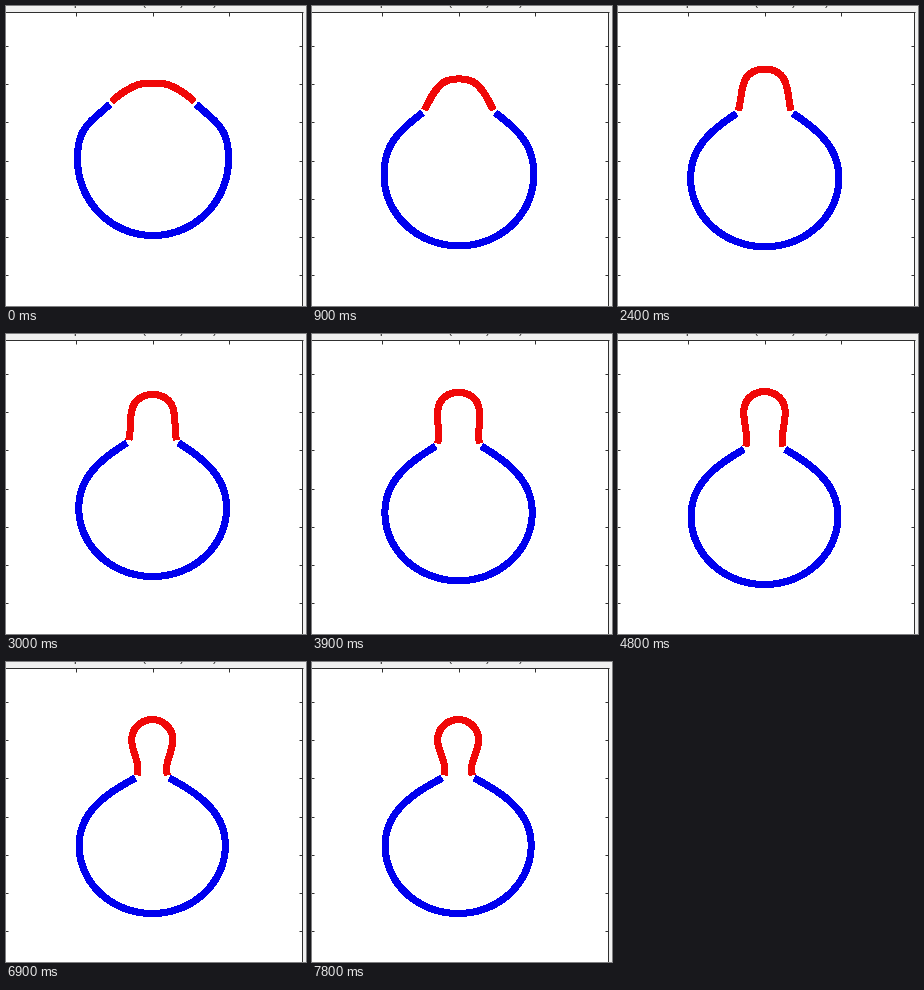
Recreate the animation shown at these times as a matplotlib script. Size 300 by 300 pixels, loop 8000 ms.

```python
import numpy as np
import matplotlib.pyplot as plt
from matplotlib.animation import FuncAnimation
from matplotlib.patches import Rectangle

PX = 0.72  # points per pixel at 100 dpi
STEP_FRAMES = 3
RIGHT, TOP = 296, 6


def smooth(x):
    x = np.clip(x, 0, 1)
    return x * x * (3 - 2 * x)


def heading(degrees):
    return np.array([np.cos(np.radians(degrees)), np.sin(np.radians(degrees))])


def bezier(start, start_angle, end, end_angle, handle):
    """Cubic from start to end; handles are a fraction of the chord."""
    start, end = np.array(start), np.array(end)
    reach = handle * np.hypot(*(end - start))
    a = start + reach * heading(start_angle)
    b = end - reach * heading(end_angle)
    t = np.linspace(0, 1, 40)[:, None]
    s = 1 - t
    return s**3 * start + 3 * s * s * t * a + 3 * s * t * t * b + t**3 * end


def mirror(half, step):
    """Full outline from a half that starts on the symmetry axis."""
    points = np.vstack([half[::-1] * (-1, 1), half])
    return (points + (147 - step / 30, 0)).T


def membrane(step):
    pinch = 1 - np.exp(-step / 12)
    early = np.exp(-step / 3)
    sink = 11 * (smooth(step / 3.5) + smooth((step - 7) / 11))
    neck = 41 - 30.5 * pinch
    rim = 98.7 + 0.8 * sink

    # Vesicle body: half ellipse below, shoulder rising to the rim
    width, height = 75.5 - 2.8 * pinch, 68 + 8 * early
    middle = 229.5 + sink - height
    angle = np.linspace(np.pi / 2, 0, 60)
    bowl = np.column_stack([width * np.cos(angle), middle + height * np.sin(angle)])
    shoulder = bezier((width, middle), -90, (neck + 2.5, rim),
                      180 + 41 - 15 * pinch, 0.38 + 0.09 * early)

    # Bud: crown bending over to the side, then down to the neck
    crown = 77 - 19.5 * smooth(pinch / 0.75)
    side = (20.5, crown + 4 + 18.5 * pinch)
    side_angle = 27 + 110 * pinch - 42 * pinch**2
    neck_angle = 42 + 110 * pinch - 80 * pinch**2
    dome = bezier((0, crown), 0, side, side_angle, 0.38)
    stem = bezier(side, side_angle, (neck, rim - 3.5), neck_angle, 0.38)

    return (mirror(np.vstack([bowl, shoulder]), step),
            mirror(np.vstack([dome, stem]), step))


fig = plt.figure(figsize=(3, 3), dpi=100, facecolor="#f0f0f0")
ax = fig.add_axes([0, 0, 1, 1])
ax.set(xlim=(0, 300), ylim=(300, 0))
ax.axis("off")
ax.add_patch(Rectangle((-1, TOP), RIGHT + 1, 300, fc="white", ec="none"))


def rule(xs, ys):
    ax.plot(xs, ys, color="#303030", lw=PX, solid_capstyle="butt")


rule([-1, RIGHT + 0.5], [TOP, TOP])
rule([RIGHT, RIGHT], [TOP, 301])
for k in range(3):
    x = 70 + 76.6 * k
    rule([x, x], [TOP, TOP + 3.5])
for k in range(7):
    y = 40 + 38.2 * k
    rule([-1, 1.5], [y, y])
    rule([RIGHT - 3, RIGHT], [y, y])

# Descenders of a title cut off by the top edge
for x, glyph in zip((71, 137, 163, 176, 190, 209), "p(,),)"):
    ax.text(x, -1, glyph, family="Liberation Sans", size=12 * PX,
            ha="center", va="baseline", color="#303030")

style = dict(lw=6 * PX, solid_capstyle="butt", antialiased=False)
body, = ax.plot([], [], color="#0000ee", **style)
bud, = ax.plot([], [], color="#f00808", **style)


def draw(frame):
    body_xy, bud_xy = membrane(frame // STEP_FRAMES)
    body.set_data(*body_xy)
    bud.set_data(*bud_xy)
    return body, bud


anim = FuncAnimation(fig, draw, frames=80, interval=100, repeat=True, repeat_delay=0)
plt.show()
```
